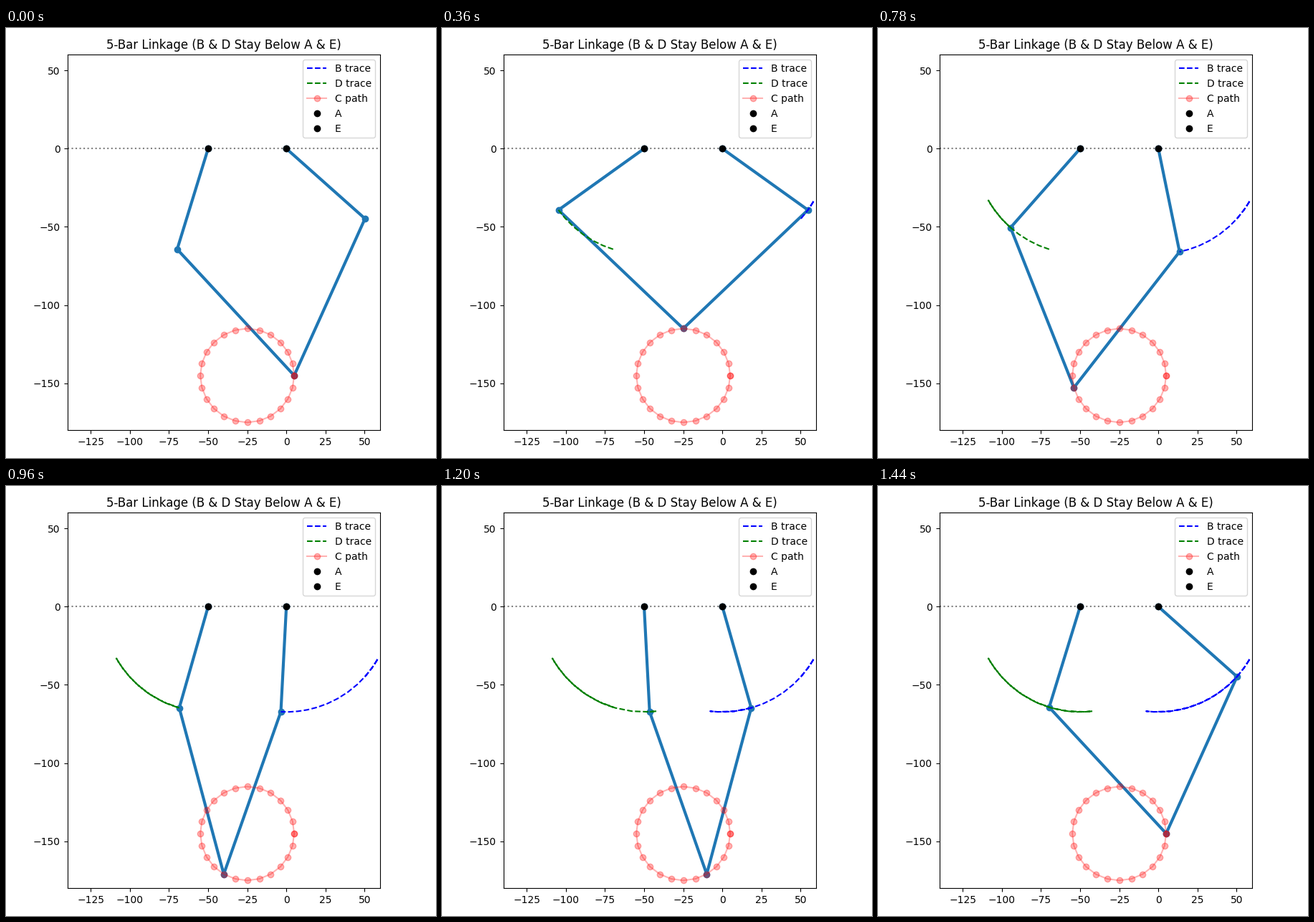
Recreate the animation shown at these times as a matplotlib script. Size 600 by 600 pixels, loop 1.5 s.

```python
import numpy as np
import matplotlib.pyplot as plt
from matplotlib.animation import FuncAnimation

FRAMES = 25
INTERVAL = 60
UPPER, LOWER = 67.3, 110.0
A = np.array([-50.0, 0.0])
E = np.array([0.0, 0.0])

# Circular path followed by the tip C
theta = np.linspace(0, 2 * np.pi, FRAMES)
C = np.column_stack([-25 + 30 * np.cos(theta), -145 + 30 * np.sin(theta)])


def elbow(base, tips, side):
    """Joint between base and each tip; side picks the bend direction."""
    diff = tips - base
    dist = np.hypot(diff[:, 0], diff[:, 1])[:, None]
    unit = diff / dist
    along = (dist**2 + UPPER**2 - LOWER**2) / (2 * dist)
    height = np.sqrt(np.maximum(UPPER**2 - along**2, 0))
    normal = np.column_stack([-unit[:, 1], unit[:, 0]])
    return base + along * unit + side * height * normal


D = elbow(A, C, -1)
B = elbow(E, C, 1)

fig, ax = plt.subplots(figsize=(6, 6), dpi=100)
ax.set_xlim(-140, 60)
ax.set_ylim(-180, 60)
ax.set_aspect("equal")
ax.set_title("5-Bar Linkage (B & D Stay Below A & E)")

ax.axhline(0, color="gray", linestyle=":")
linkage, = ax.plot([], [], "o-", color="tab:blue", lw=3)
trace_b, = ax.plot([], [], "b--", label="B trace")
trace_d, = ax.plot([], [], "g--", label="D trace")
ax.plot(C[:, 0], C[:, 1], "ro-", alpha=0.3, label="C path")
ax.plot(*A, "ko", label="A")
ax.plot(*E, "ko", label="E")
ax.legend(loc="upper right")
fig.tight_layout()


def update(i):
    linkage.set_data(*np.array([A, D[i], C[i], B[i], E]).T)
    trace_b.set_data(*B[:i + 1].T)
    trace_d.set_data(*D[:i + 1].T)
    return linkage, trace_b, trace_d


anim = FuncAnimation(fig, update, frames=FRAMES, interval=INTERVAL,
                     repeat=True, repeat_delay=0)
plt.show()
```
